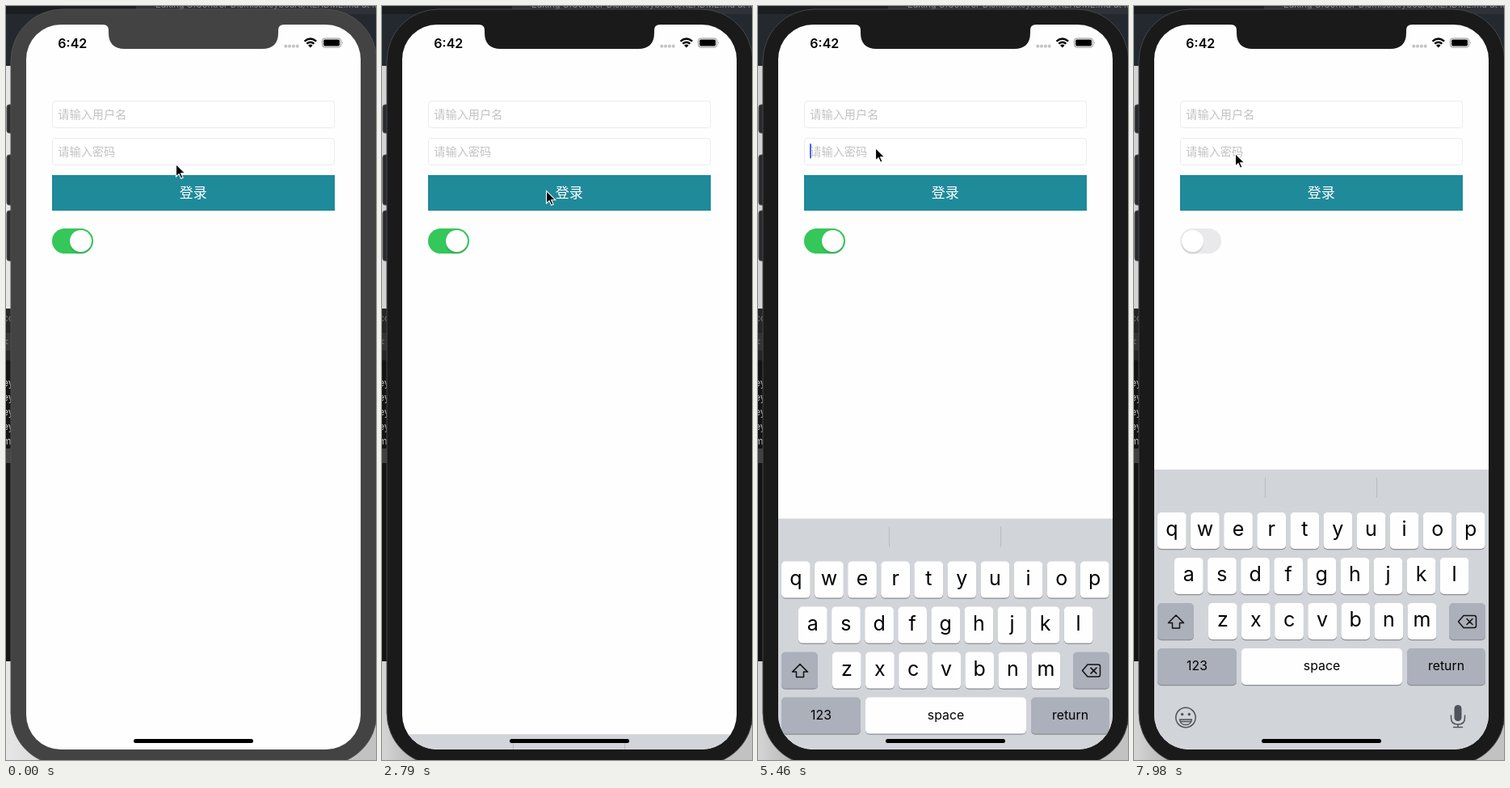
Recreate the animation shown at these times as an HTML page. Size 458 by 932 pixels, loop 8000 ms.

```html
<!DOCTYPE html>
<html lang="zh">
<head>
<meta charset="utf-8">
<style>
  html, body { margin: 0; height: 100%; overflow: hidden; }
  svg { display: block; width: 458px; height: 932px; font-family: Inter, Roboto, sans-serif; }
  .cjk { font-family: "Noto Sans CJK SC", "Noto Sans CJK", sans-serif; }
  .hint { font-size: 14.2px; fill: #c2c2c4; }
  .field { fill: #fff; stroke: #ececec; }
  .mid { text-anchor: middle; }
  .line { fill: none; stroke: #111; stroke-width: 1.5; stroke-linejoin: round; stroke-linecap: round; }
  .grey { stroke: #50535a; }
</style>
</head>
<body>
<svg viewBox="0 0 458 932">
  <defs>
    <clipPath id="screen"><rect x="25" y="23" width="414" height="896" rx="43"/></clipPath>
    <linearGradient id="shade"><stop offset="0" stop-opacity=".12"/><stop offset="1" stop-opacity=".3"/></linearGradient>
  </defs>

  <!-- desktop behind the phone -->
  <rect width="458" height="932" fill="#f2f2f2"/>
  <rect width="458" height="74" fill="#24292f"/>
  <rect width="458" height="10" fill="#303238"/>
  <rect width="161" height="10" fill="#1c1d20"/>
  <text x="185" y="1.5" font-size="11" fill="#8b8d91">Editing UIControl-DismissKeyboard/README.md at ma</text>
  <g fill="#2f3032" stroke="#555">
    <rect x="1" y="122" width="20" height="35" rx="3"/>
    <rect x="1" y="184" width="20" height="62" rx="3"/>
    <rect x="1" y="253" width="20" height="62" rx="3"/>
  </g>
  <rect y="374" width="30" height="436" fill="#161616"/>
  <rect y="374" width="30" height="64" fill="#2b2b2c"/>
  <rect y="404" width="30" height="22" fill="#3a3a3b"/>
  <rect y="547" width="30" height="18" fill="#4a4a4a"/>
  <g id="code" font-size="12" fill="#d8d8d8"></g>
  <rect id="shadow" y="74" width="60" height="858" fill="url(#shade)"/>
  <rect id="corner" x="398" y="870" width="60" height="62" opacity=".2"/>

  <!-- phone -->
  <rect id="bezel" x="6" y="4" width="453" height="934" rx="64"/>
  <g clip-path="url(#screen)">
    <rect x="25" y="23" width="414" height="896" fill="#fefefe"/>
    <rect class="field" x="57.5" y="117.5" width="349" height="33" rx="3.5"/>
    <rect class="field" x="57.5" y="163.5" width="349" height="33" rx="3.5"/>
    <text class="cjk hint" x="64.3" y="138.5">请输入用户名</text>
    <text class="cjk hint" x="64.3" y="184.5">请输入密码</text>
    <rect id="caret" x="64" y="170" width="2" height="18.5" rx="1" fill="#456be0"/>
    <rect x="57" y="209" width="350" height="44" fill="#1f8a99"/>
    <text class="cjk mid" x="231.7" y="237.3" font-size="17" fill="#fff">登录</text>
    <rect x="57" y="275" width="51" height="31" rx="15.5" fill="#e9e9eb"/>
    <rect id="green" x="57" y="275" width="51" height="31" rx="15.5" fill="#34c759"/>
    <g id="knob">
      <circle cx="72.5" cy="293" r="13.7" opacity=".09"/>
      <circle cx="72.5" cy="290.5" r="13.5" fill="#fff"/>
    </g>
    <g id="keyboard">
      <rect x="25" y="573" width="414" height="350" fill="#d1d4d9"/>
      <path d="M162.5 583v25M300.5 583v25" stroke="#b8bbc1"/>
      <g id="keys"></g>
      <path class="line" d="M52 753l9.5 9.5h-5v6.5h-9v-6.5h-5z"/>
      <path class="line" d="M408 753.500h13q2.500 0 2.500 2.500v10q0 2.500-2.500 2.500h-13l-6.500-7.500zM412 757.500l7 7m0-7l-7 7"/>
      <g class="line grey">
        <circle cx="64" cy="879.500" r="12.200"/>
        <path d="M56.500 882h15q-1 6.500-7.500 6.500t-7.500-6.500zM57.500 884.500h13"/>
        <path d="M392.500 877v3q0 8 8.500 8t8.500-8v-3M401 888v3.500M395.500 891.500h11"/>
      </g>
      <g fill="#50535a">
        <circle cx="59.700" cy="875.500" r="1.700"/><circle cx="68.300" cy="875.500" r="1.700"/>
        <rect x="396.500" y="864" width="9" height="20" rx="4.500"/>
      </g>
    </g>
    <rect x="158" y="906" width="148" height="5" rx="2.500"/>
  </g>
  <path id="notch" d="M120 22V23Q127 23 127 30V33Q127 53 147 53H317Q337 53 337 33V30Q337 23 344 23V22Z"/>

  <!-- status bar -->
  <text class="mid" x="82.300" y="51.500" font-size="16" font-weight="600">6:42</text>
  <g fill="#c6c6c8">
    <circle cx="346.300" cy="49.700" r="2.100"/><circle cx="351" cy="49.700" r="2.100"/>
    <circle cx="355.800" cy="49.700" r="2.100"/><circle cx="360.700" cy="49.700" r="2.100"/>
  </g>
  <g fill="none" stroke="#000" stroke-width="2.300">
    <path d="M369.500 43.700q7.300-6.300 14.600 0M372.200 46.700q4.600-4 9.200 0"/>
  </g>
  <path d="M374 48.700q2.800-2.200 5.600 0l-2.800 2.900z"/>
  <rect x="391.500" y="40" width="23" height="11" rx="3" fill="none" stroke="#8c8c8c"/>
  <rect x="393" y="41.500" width="20" height="8" rx="1.700"/>
  <path d="M416 43.700q1.800 1.800 0 3.600z" fill="#8c8c8c"/>

  <path id="cursor" d="M.5 .5V16l3.600-3.400 2.500 5.700 2.500-1.100-2.500-5.500h5z" stroke="#fff" stroke-width="1.100"/>
</svg>
<script>
const $ = id => document.getElementById(id);
const LOOP = 8000, STEP = 147.8, LEAD = 18, KEYBOARD_HEIGHT = 346;
const ACTIVATE = 865, SWITCH_OFF = 6150;

// [focus, blur] times of the password field
const sessions = [[1040, 2536], [3472, 4350], [5277, SWITCH_OFF], [7060, 9999]];

// pointer stops: time, x, y
const stops = [
  [0, 210, 195], [600, 165, 181], [860, 165, 181], [1180, 171, 183], [1460, 177, 194],
  [1756, 191, 219], [2050, 203, 228], [2795, 203, 228], [3235, 196, 181], [3470, 196, 181],
  [3825, 219, 214], [4250, 230, 320], [4400, 228, 322], [5200, 147, 176], [5450, 145, 175],
  [6050, 88, 287], [6300, 86, 288], [6932, 121, 184], [7963, 125, 182], [LOOP, 125, 182]
];

function addKey(x, y, w, label, size = 25, fill = '#fefefe') {
  const baseline = size > 20 ? 29.3 : 27;
  $('keys').innerHTML += `
    <rect x="${x}" y="${y + 1.2}" width="${w}" height="45" rx="5" fill="#8b8e94"/>
    <rect x="${x}" y="${y}" width="${w}" height="45" rx="5" fill="${fill}"/>
    <text class="mid" x="${x + w / 2}" y="${y + baseline}" font-size="${size}">${label}</text>`;
}

[['qwertyuiop', 29], ['asdfghjkl', 50], ['zxcvbnm', 92]].forEach(([letters, x], row) =>
  [...letters].forEach((c, i) => addKey(x + 41.1 * i, 626 + 56 * row, 35.7, c)));
const dark = '#abb0ba';
addKey(29, 738, 45, '', 16, dark);
addKey(390, 738, 45, '', 16, dark);
addKey(29, 794, 98, '123', 15.8, dark);
addKey(133, 794, 199, 'space', 15.8);
addKey(338, 794, 97, 'return', 15.8, dark);

[['cc', 390], ['&lt;', 419], ['ey', 470], ['ey', 488], ['ey', 506], ['ey', 524], ['m', 542]].forEach(([s, y]) =>
  $('code').innerHTML += `<text x="-4" y="${y}" opacity="${y < 430 ? .5 : 1}">${s}</text>`);

const clamp = v => Math.min(1, Math.max(0, v));
const smooth = v => v * v * (3 - 2 * v);

// critically damped spring, 0 to 1
function spring(ms) {
  const a = Math.max(0, ms) * .01826;
  return 1 - (1 + a) * Math.exp(-a);
}

function pointer(t) {
  const i = stops.findIndex(s => s[0] > t);
  const [t0, x0, y0] = stops[i - 1], [t1, x1, y1] = stops[i];
  const k = smooth((t - t0) / (t1 - t0));
  return [x0 + (x1 - x0) * k, y0 + (y1 - y0) * k];
}

function draw(t) {
  const shown = sessions.reduce((sum, [a, b]) => sum + spring(t - a) - spring(t - b), 0);
  const caret = sessions.some(([a, b]) => t >= a && t < b - 50 && (t - a) % 1000 < 500);
  const on = 1 - smooth(clamp((t - SWITCH_OFF) / 250));
  const active = t >= ACTIVATE;
  const body = active ? '#1a1a1a' : '#434343';

  $('keyboard').setAttribute('transform', `translate(0 ${KEYBOARD_HEIGHT * (1 - shown)})`);
  $('caret').setAttribute('opacity', +caret);
  $('green').setAttribute('opacity', on);
  $('knob').setAttribute('transform', `translate(${20 * on} 0)`);
  $('bezel').setAttribute('fill', body);
  $('bezel').setAttribute('stroke', active ? '#44474c' : '#505050');
  $('notch').setAttribute('fill', body);
  $('shadow').setAttribute('opacity', active ? 1 : .4);
  $('cursor').setAttribute('transform', `translate(${pointer(t)})`);
}

function tick() {
  const t = performance.now() % LOOP;
  draw(Math.max(0, Math.floor((t + LEAD) / STEP) * STEP - LEAD));
  requestAnimationFrame(tick);
}
tick();
</script>
</body>
</html>
```
